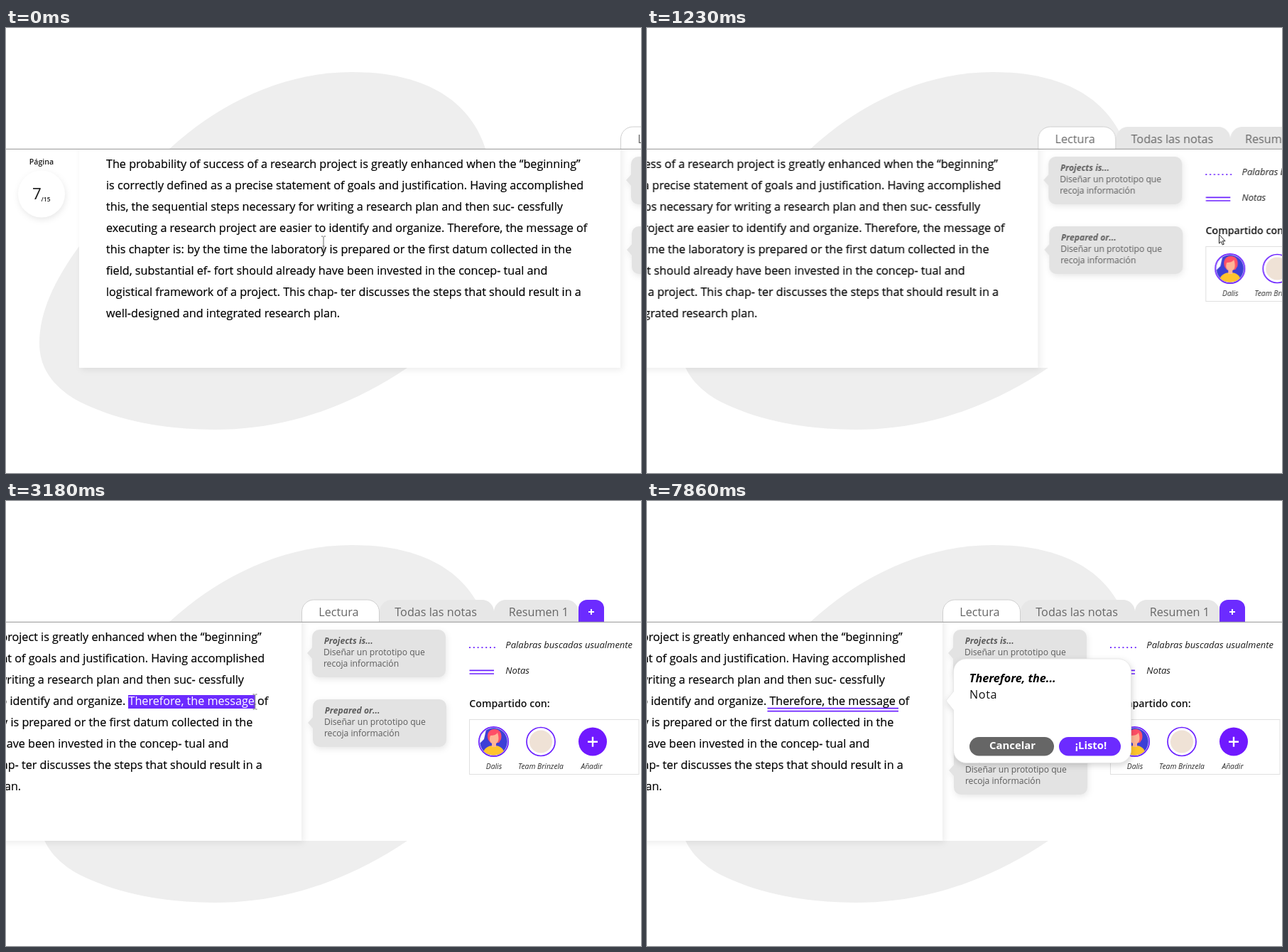
These frames come from a looping animation (894x626 px, 9.42 s). An HTML page:

```html
<!DOCTYPE html>
<html lang="es">
<head>
<meta charset="utf-8">
<title>Lectura con notas</title>
<style>
  html, body { margin: 0; width: 100%; height: 100%; overflow: hidden; background: #fff; }
  svg { display: block; width: 894px; height: 626px; font-family: "Open Sans", "Noto Sans", sans-serif; }
  text { white-space: pre; }

  .body { font-size: 16.18px; fill: #000; stroke: #000; stroke-width: .2px; }
  .tab { font-size: 16.2px; fill: #666; }
  .card { font-size: 12.15px; fill: #5c5c5c; }
  .card rect, .card path { fill: #e3e3e3; }
  .bi { font-weight: 700; font-style: italic; }
  .legend { font-size: 13px; font-style: italic; fill: #1a1a1a; }
  .who { font-size: 10.3px; font-style: italic; fill: #2a2a2a; text-anchor: middle; }
  .btn { font-size: 14.9px; font-weight: 700; fill: #fff; text-anchor: middle; }
  .line { fill: none; stroke: #6c22ff; stroke-width: 1.7; }
  .soft { filter: drop-shadow(1px 3px 4px rgba(0, 0, 0, .09)); }
  .paper { filter: drop-shadow(3px 3px 4px rgba(0, 0, 0, .07)); }
  .float { filter: drop-shadow(1px 3px 4px rgba(0, 0, 0, .16)); }

  /* One loop is 9420 ms: percentage = ms / 94.2 */
  .scroll, .sel, .menu, .note, .lower, .hint, .typed tspan, .cursor, .beam, .arrow {
    animation: 9420ms linear infinite;
  }
  .scroll { animation-name: scroll; }
  .sel { animation-name: drag, unselect; }
  .menu { animation-name: menu; }
  .note { animation-name: appear; }
  .lower { animation-name: lower; }
  .hint { animation-name: hint; }
  .typed tspan:nth-child(1) { animation-name: key1; }
  .typed tspan:nth-child(2) { animation-name: key2; }
  .typed tspan:nth-child(3) { animation-name: key3; }
  .typed tspan:nth-child(4) { animation-name: key4; }
  .cursor { animation-name: move; }
  .beam { animation-name: beam; }
  .arrow { animation-name: arrow; }
  .menu, .hint, .typed tspan, .beam, .arrow { animation-timing-function: step-end; }

  @keyframes scroll {
    0% { transform: translateX(449px); }
    9.8726% { transform: translateX(449px); animation-timing-function: cubic-bezier(.333, .19, .667, .81); }
    14.6497%, 100% { transform: none; }
  }
  @keyframes drag {
    0%, 28.0255% { clip-path: inset(0 100% 0 0); }
    33.758%, 100% { clip-path: inset(0 0 0 0); }
  }
  @keyframes unselect { 0%, 56.051% { opacity: 1; } 57.9618%, 100% { opacity: 0; } }
  @keyframes menu { 0% { opacity: 0; } 43.949% { opacity: 1; } 56.3694%, 100% { opacity: 0; } }
  @keyframes appear { 0%, 56.051% { opacity: 0; } 57.9618%, 100% { opacity: 1; } }
  @keyframes lower {
    0% { transform: none; }
    56.051% { transform: none; animation-timing-function: ease-in-out; }
    57.9618%, 100% { transform: translateY(67px); }
  }
  @keyframes hint { 0% { opacity: 1; } 73.5669%, 100% { opacity: 0; } }
  @keyframes key1 { 0% { fill-opacity: 0; } 77.0701%, 100% { fill-opacity: 1; } }
  @keyframes key2 { 0% { fill-opacity: 0; } 77.3885%, 100% { fill-opacity: 1; } }
  @keyframes key3 { 0% { fill-opacity: 0; } 78.0255%, 100% { fill-opacity: 1; } }
  @keyframes key4 { 0% { fill-opacity: 0; } 78.3439%, 100% { fill-opacity: 1; } }
  @keyframes move {
    0% { transform: translate(447px, 303.5px); }
    5.0955% { transform: translate(447px, 303.5px); animation-timing-function: cubic-bezier(.33, .15, .67, .85); }
    8.5987% { transform: translate(805px, 290px); }
    21.3376% { transform: translate(805px, 290px); animation-timing-function: cubic-bezier(.33, .15, .67, .9); }
    26.4331%, 28.0255% { transform: translate(172px, 282.5px); }
    33.758% { transform: translate(350.5px, 282.5px); }
    36.9427% { transform: translate(350.5px, 282.5px); animation-timing-function: ease-in-out; }
    38.8535% { transform: translate(314px, 276.5px); animation-timing-function: step-end; }
    43.949% { transform: translate(314px, 265.5px); }
    48.4076% { transform: translate(314px, 265.5px); animation-timing-function: ease-in-out; }
    51.5924% { transform: translate(397px, 251.5px); }
    61.465% { transform: translate(397px, 251.5px); animation-timing-function: cubic-bezier(.4, .46, .7, 1); }
    65.6051%, 100% { transform: translate(453.5px, 272px); }
  }
  @keyframes beam {
    0% { opacity: 1; } 8.2803% { opacity: 0; }
    24.31% { opacity: 1; } 43.949% { opacity: 0; }
    64.3312% { opacity: 1; } 83.4395%, 100% { opacity: 0; }
  }
  @keyframes arrow {
    0% { opacity: 0; } 8.2803% { opacity: 1; }
    24.31% { opacity: 0; } 43.949% { opacity: 1; }
    64.3312%, 100% { opacity: 0; }
  }
</style>
</head>
<body>
<svg viewBox="0 0 894 626">
  <defs>
    <clipPath id="below"><rect x="-500" y="171" width="2000" height="455"/></clipPath>
    <clipPath id="face"><circle cx="686.5" cy="338.5" r="19.3"/></clipPath>
  </defs>

  <path fill="#eee" d="M230 170C300 106 390 62 487 62C590 62 653 102 675 170C705 280 670 405 565 478C480 535 390 565 293 565C225 565 150 552 95 521C62 500 47 475 47 443C47 400 68 355 103 307Z"/>

  <g class="scroll">
    <!-- Tabs -->
    <g fill="#e7e7e7">
      <path d="M526 170V156a17 17 0 0 1 17-17h127a17 17 0 0 1 17 17v14z"/>
      <path d="M687 170V156a17 17 0 0 1 17-17h85a17 17 0 0 1 17 17v14z"/>
    </g>
    <path fill="#fff" stroke="#cfcfcf" d="M416.5 170V156a17 17 0 0 1 17-17h75a17 17 0 0 1 17 17v14"/>
    <path fill="#6c2bff" d="M806 170V151a12 12 0 0 1 12-12h12a12 12 0 0 1 12 12v19z"/>
    <path stroke="#fff" stroke-width="2" d="M820 156h8M824 152v8"/>
    <g class="tab">
      <text x="440.3" y="161.8">Lectura</text>
      <text x="547.3" y="161.8">Todas las notas</text>
      <text x="707.7" y="161.8">Resumen 1</text>
    </g>

    <!-- Page -->
    <g clip-path="url(#below)">
      <rect x="416" y="171" width="960" height="307" fill="#fff"/>
      <rect class="paper" x="-346" y="160" width="762" height="318" fill="#fff"/>
    </g>
    <circle class="soft" cx="-399" cy="233.5" r="33" fill="#fff"/>
    <g fill="#1c1c1c" text-anchor="middle">
      <text x="-399" y="192" font-size="10.6" font-weight="600">Página</text>
      <text x="-405.5" y="240.5" font-size="22.5">7</text>
      <text x="-393" y="244" font-size="8.4" font-weight="600">/15</text>
    </g>
    <g class="body">
      <text x="-308" y="197">The probability of success of a research project is greatly enhanced when the “beginning”</text>
      <text x="-308" y="227">is correctly defined as a precise statement of goals and justification. Having accomplished</text>
      <text x="-308" y="257">this, the sequential steps necessary for writing a research plan and then suc- cessfully</text>
      <text x="-308" y="287">executing a research project are easier to identify and organize. Therefore, the message of</text>
      <text x="-308" y="317">this chapter is: by the time the laboratory is prepared or the first datum collected in the</text>
      <text x="-308" y="347">field, substantial ef- fort should already have been invested in the concep- tual and</text>
      <text x="-308" y="377">logistical framework of a project. This chap- ter discusses the steps that should result in a</text>
      <text x="-308" y="407">well-designed and integrated research plan.</text>
    </g>
    <g class="sel">
      <rect x="172" y="273" width="178.5" height="19" fill="#6c2bff"/>
      <text class="body" x="172.5" y="287" style="fill: #fff; stroke: none">Therefore, the message</text>
    </g>

    <!-- Legend and sharing -->
    <path class="line" stroke-dasharray="2 3.8" d="M652 206.2h37"/>
    <path class="line" d="M652.5 238.3h34.5M652.5 243h34.5"/>
    <g class="legend">
      <text x="703.3" y="206.5">Palabras buscadas usualmente</text>
      <text x="703.3" y="243.2">Notas</text>
    </g>
    <text x="652.3" y="290.3" font-size="14.15" font-weight="600" fill="#111">Compartido con:</text>
    <rect x="652.5" y="307.5" width="238.5" height="77" fill="#fff" stroke="#e0e0e0"/>
    <g clip-path="url(#face)">
      <rect x="665" y="317" width="43" height="43" fill="#3d3fd6"/>
      <path fill="#fff" d="M665 317h12l-4 18-8 8z"/>
      <path fill="#ff4f67" d="M679 336c-3-8 1-15 8-15 8-1 12 6 10 14l-3 5h-12z"/>
      <path fill="#ffc52e" d="M671 360c0-11 6-16 16-16s15 5 15 16z"/>
      <path fill="#ffb596" d="M682 330c4 0 8-1 10-4 3 9 1 14-2 15v5h-6v-5c-3-2-4-6-2-11z"/>
    </g>
    <circle class="line" cx="686.5" cy="338.5" r="20.7"/>
    <circle class="line" cx="753" cy="338.5" r="20"/>
    <circle cx="753" cy="338.5" r="16" fill="#efe2d6"/>
    <circle cx="826" cy="338.5" r="20" fill="#7019ff"/>
    <path stroke="#fff" stroke-width="2.4" d="M819 338.8h14M826 331.8v14"/>
    <g class="who">
      <text x="687" y="376.5">Dalis</text>
      <text x="753" y="376.5">Team Brinzela</text>
      <text x="824.5" y="376.5">Añadir</text>
    </g>

    <!-- Notes -->
    <g class="card">
      <g class="soft">
        <rect x="431" y="181" width="188" height="67" rx="10"/>
        <path d="M432 205l-8 9 8 9z"/>
      </g>
      <text class="bi" x="447.8" y="200.5">Projects is...</text>
      <text x="446.9" y="216.8">Diseñar un prototipo que</text>
      <text x="446.9" y="232.8">recoja información</text>
    </g>
    <g class="card lower">
      <g class="soft">
        <rect x="432" y="279" width="188" height="67" rx="10"/>
        <path d="M433 303l-8 9 8 9z"/>
      </g>
      <text class="bi" x="448.8" y="299">Prepared or...</text>
      <text x="447.9" y="315.2">Diseñar un prototipo que</text>
      <text x="447.9" y="331.2">recoja información</text>
    </g>
  </g>

  <path stroke="#a8a8a8" stroke-width="1.4" d="M0 170.4H894"/>

  <rect class="menu" x="318.5" y="246.5" width="105" height="25" rx="6" fill="#fff" stroke="#ddd"/>

  <!-- New annotation -->
  <g class="note">
    <path class="line" d="M169.5 291.6H354M169.5 295.6H354"/>
    <path class="float" fill="#fff" stroke="#e4e4e4" stroke-width=".8" d="M431.5 268V240a18 18 0 0 1 18-18h214a18 18 0 0 1 18 18v110.5a18 18 0 0 1-18 18h-214a18 18 0 0 1-18-18V294L421 281z"/>
    <text class="bi" x="453.8" y="254.8" font-size="16.2">Therefore, the...</text>
    <text class="hint" x="451.8" y="277" font-size="16.2" fill="#8c8c8c">Escribe tu anotación</text>
    <text class="typed" x="454" y="277.8" font-size="16.2" letter-spacing=".6" fill="#111"><tspan>N</tspan><tspan>o</tspan><tspan>t</tspan><tspan>a</tspan></text>
    <rect x="454" y="332" width="119" height="26.5" rx="13.25" fill="#666"/>
    <rect x="580" y="332" width="87" height="26.5" rx="13.25" fill="#6c2bff"/>
    <g class="btn">
      <text x="514.6" y="349">Cancelar</text>
      <text x="625" y="349">¡Listo!</text>
    </g>
  </g>

  <g class="cursor">
    <path class="beam" fill="none" stroke="#666" d="M-3-10.5H-1L0-9.5 1-10.5H3M0-9.5V9.5M-3 10.5H-1L0 9.5 1 10.5H3M-1.5 3.5h3"/>
    <path class="arrow" fill="#fff" stroke="#222" stroke-linejoin="round" d="M.5.5V13L3.3 10.4 5.3 15 7.3 14.1 5.3 9.7H9z"/>
  </g>
</svg>
</body>
</html>
```
